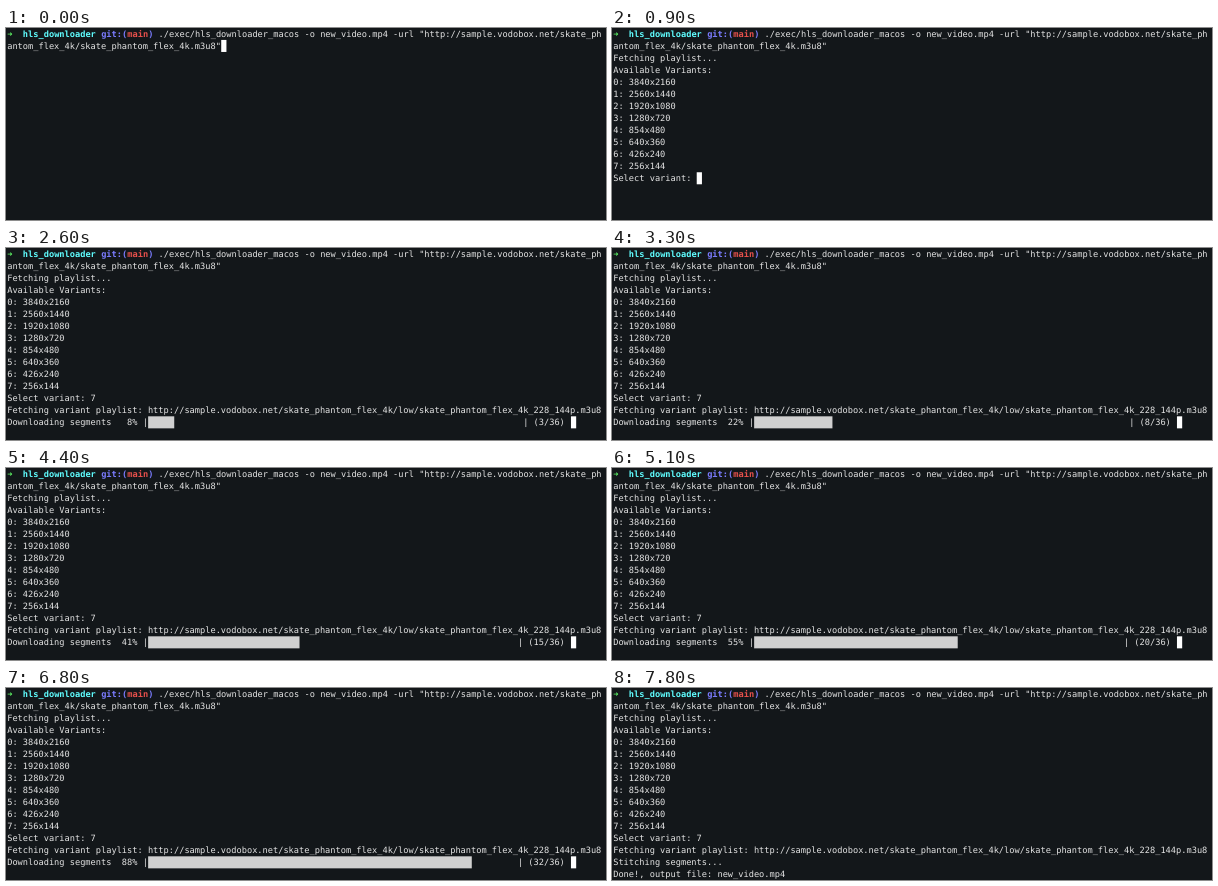
An HTML page that plays this animation: 600x192 px, repeating every 9.2 s.

```html
<!DOCTYPE html>
<html lang="en">
<head>
<meta charset="utf-8">
<title>hls_downloader</title>
<style>
  html, body { margin: 0; width: 100%; height: 100%; overflow: hidden; background: #13171a; }
  svg { display: block; width: 600px; height: 192px; }
  text {
    font: 8.67px "DejaVu Sans Mono", monospace;
    fill: #e4e4e4;
    white-space: pre;
    text-rendering: geometricPrecision;
  }
  .bold { font-weight: bold; }
  .green { fill: #5ff967; }
  .cyan { fill: #60fdff; }
  .blue { fill: #7b7cff; }
  .red { fill: #e8514c; }
  #bar { fill: #d0d0d0; }
  #cursor { fill: #fff; }
</style>
</head>
<body>
<svg id="term" viewBox="0 0 600 192">
  <rect id="bar"/>
  <rect id="cursor"/>
</svg>
<script>
const LOOP = 9200;
const CELL = 5.22, LINE = 12.03, LEFT = 1.2, TOP = -0.1, BASE = 8.7;
const ROWS = 16, COLS = 108, BAR_COL = 27, BAR_ROW = 14, TOTAL = 36;

const term = document.getElementById('term');
const bar = document.getElementById('bar');
const cursor = document.getElementById('cursor');
const colX = col => LEFT + col * CELL;
const rowY = row => TOP + row * LINE;

function addText(col, row, text = '', cls = '') {
  const el = document.createElementNS('http://www.w3.org/2000/svg', 'text');
  el.setAttribute('x', colX(col));
  el.setAttribute('y', rowY(row) + BASE);
  el.setAttribute('class', cls);
  el.textContent = text;
  term.append(el);
  return el;
}

function setBox(el, col, row, cols) {
  el.setAttribute('x', colX(col));
  el.setAttribute('y', rowY(row));
  el.setAttribute('width', cols * CELL);
  el.setAttribute('height', LINE);
}

// Shell prompt and command
[
  [0, '➜', 'bold green'],
  [3, 'hls_downloader', 'bold cyan'],
  [18, 'git:(', 'bold blue'],
  [23, 'main', 'bold red'],
  [27, ')', 'bold blue'],
  [29, './exec/hls_downloader_macos -o new_video.mp4 -url "http://sample.vodobox.net/skate_ph']
].forEach(([col, text, cls]) => addText(col, 0, text, cls));
addText(0, 1, 'antom_flex_4k/skate_phantom_flex_4k.m3u8"');

const sizes = ['3840x2160', '2560x1440', '1920x1080', '1280x720',
               '854x480', '640x360', '426x240', '256x144'];

// Output: [time, row, text]
const output = [
  [700, 2, 'Fetching playlist...'],
  [900, 3, 'Available Variants:'],
  ...sizes.map((size, i) => [900, 4 + i, `${i}: ${size}`]),
  [900, 12, 'Select variant: '],
  [1700, 12, 'Select variant: 7'],
  [2000, 13, 'Fetching variant playlist: http://sample.vodobox.net/skate_phantom_flex_4k/low/skate_phantom_flex_4k_228_144p.m3u8'],
  [7300, 14, 'Stitching segments...'],
  [7800, 15, 'Done!, output file: new_video.mp4']
];

// Cursor: [time, column, row]
const cursorSteps = [
  [0, 41, 1], [700, 0, 3], [900, 16, 12], [1700, 17, 12],
  [2000, 0, 14], [2400, COLS, 14], [7300, 0, 15], [7800, 0, 16]
];

// Segments arrive 100 ms apart in bursts, with a longer gap between bursts
const arrivals = [];
let next = 2400;
for (const size of [3, 2, 3, 2, 2, 2, 2, 3, 2, 3, 2, 3, 2, 3, 1]) {
  for (let i = 0; i < size; i++, next += 100) arrivals.push(next);
  next += 100;
}

const lines = Array.from({ length: ROWS }, (_, row) => addText(0, row));

function progress(done) {
  const percent = Math.floor(done / TOTAL * 100);
  const tail = `| (${done}/${TOTAL}) `;
  const width = COLS - BAR_COL - tail.length;
  const head = `Downloading segments ${String(percent).padStart(3)}% |`;
  return {
    text: head + ' '.repeat(width) + tail,
    fill: Math.floor(percent * width / 100)
  };
}

function draw(t) {
  const texts = Array(ROWS).fill('');
  let fill = 0;
  for (const [at, row, text] of output) if (t >= at) texts[row] = text;
  if (t >= arrivals[0] && t < 7300) {
    const state = progress(arrivals.filter(at => t >= at).length);
    texts[BAR_ROW] = state.text;
    fill = state.fill;
  }
  lines.forEach((line, i) => {
    if (line.textContent !== texts[i]) line.textContent = texts[i];
  });
  setBox(bar, BAR_COL, BAR_ROW, fill);
  const [, col, row] = cursorSteps.filter(([at]) => t >= at).pop();
  setBox(cursor, col, row, 1);
}

const start = performance.now();
function tick() {
  draw((performance.now() - start) % LOOP);
  requestAnimationFrame(tick);
}
tick();
</script>
</body>
</html>
```
